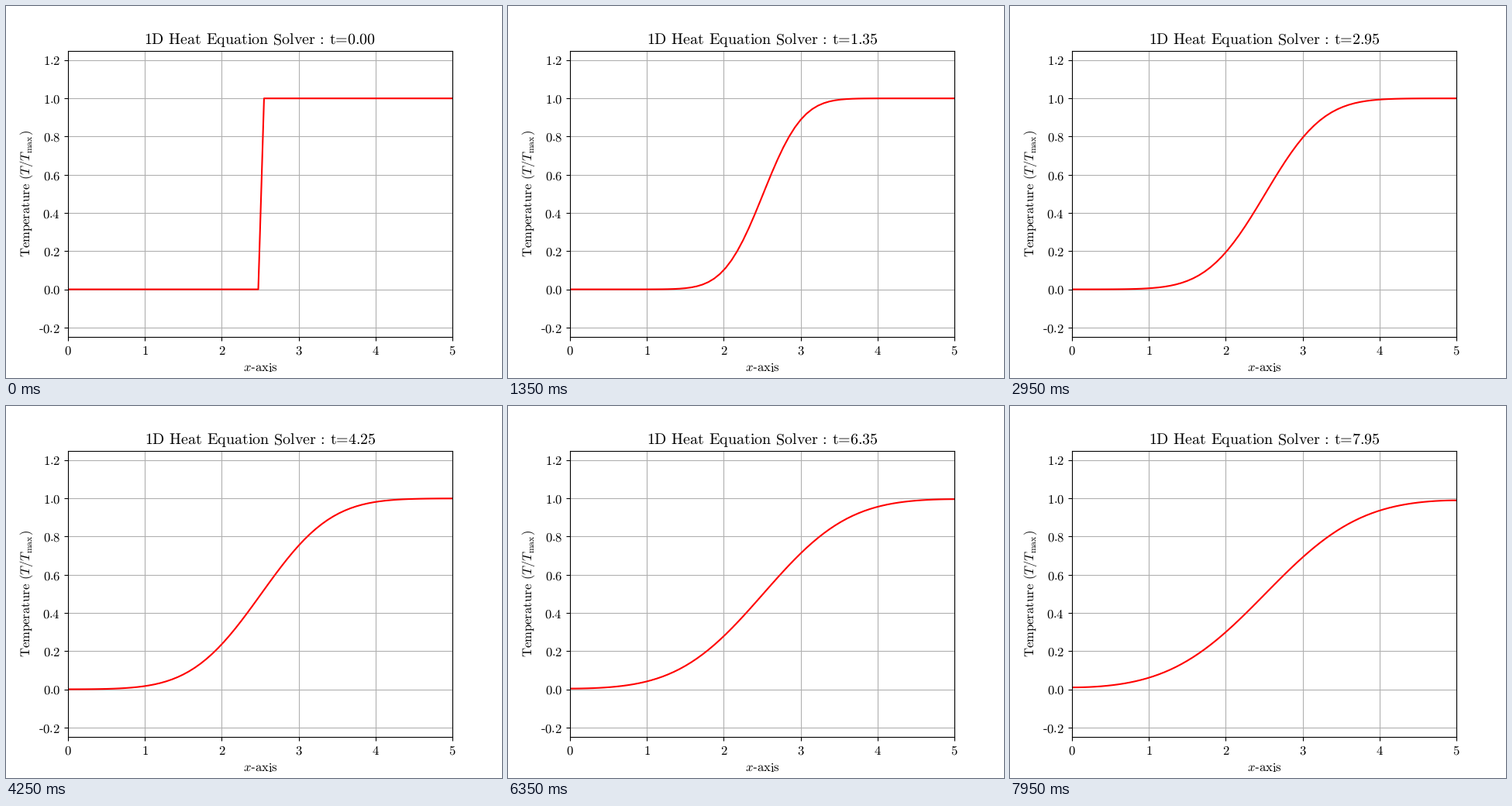
A matplotlib script that plays this animation: 640x480 px, repeating every 8000 ms.

```python
import matplotlib.pyplot as plt
import numpy as np
from matplotlib.animation import FuncAnimation

plt.rcParams.update({
    "mathtext.fontset": "cm",
    "font.size": 12,
    "text.hinting": "none",
})

FRAMES, STEP_MS = 160, 50
DT = STEP_MS / 1000
DX, ALPHA, SUBSTEPS = 0.075, 0.06, 10


def roman(s):
    return rf"$\text{{{s}}}$"


def solve():
    """Explicit 1D diffusion of a step with insulated ends."""
    x = np.arange(68) * DX
    temp = np.where(x > 2.5, 1.0, 0.0)
    r = ALPHA * DT / SUBSTEPS / DX**2
    rows = [temp]
    for _ in range(FRAMES - 1):
        for _ in range(SUBSTEPS):
            p = np.pad(temp, 1, mode="reflect")
            temp = temp + r * (p[2:] - 2 * temp + p[:-2])
        rows.append(temp)
    return x, rows


x, history = solve()

fig, ax = plt.subplots(figsize=(6.4, 4.8), dpi=100)
line, = ax.plot(x, history[0], color="red", lw=1.5)
ax.set_xlim(0, 5)
ax.set_ylim(-0.25, 1.25)
ax.grid(True)

xs = np.arange(6)
ys = np.arange(-1, 7) / 5
ax.set_xticks(xs, [roman(v) for v in xs])
ax.set_yticks(ys, [roman(f"{v:.1f}") for v in ys])
ax.set_xlabel("$x\\text{\u2010axis}$")
ax.set_ylabel(r"$\text{Temperature (}T/T_{\mathrm{max}}\text{)}$")
title = ax.set_title("")


def update(i):
    line.set_ydata(history[i])
    title.set_text(roman(f"1D Heat Equation Solver : t={i * DT:.2f}"))
    return line, title


anim = FuncAnimation(fig, update, frames=FRAMES, interval=STEP_MS,
                     repeat=True, repeat_delay=0)
plt.show()
```
